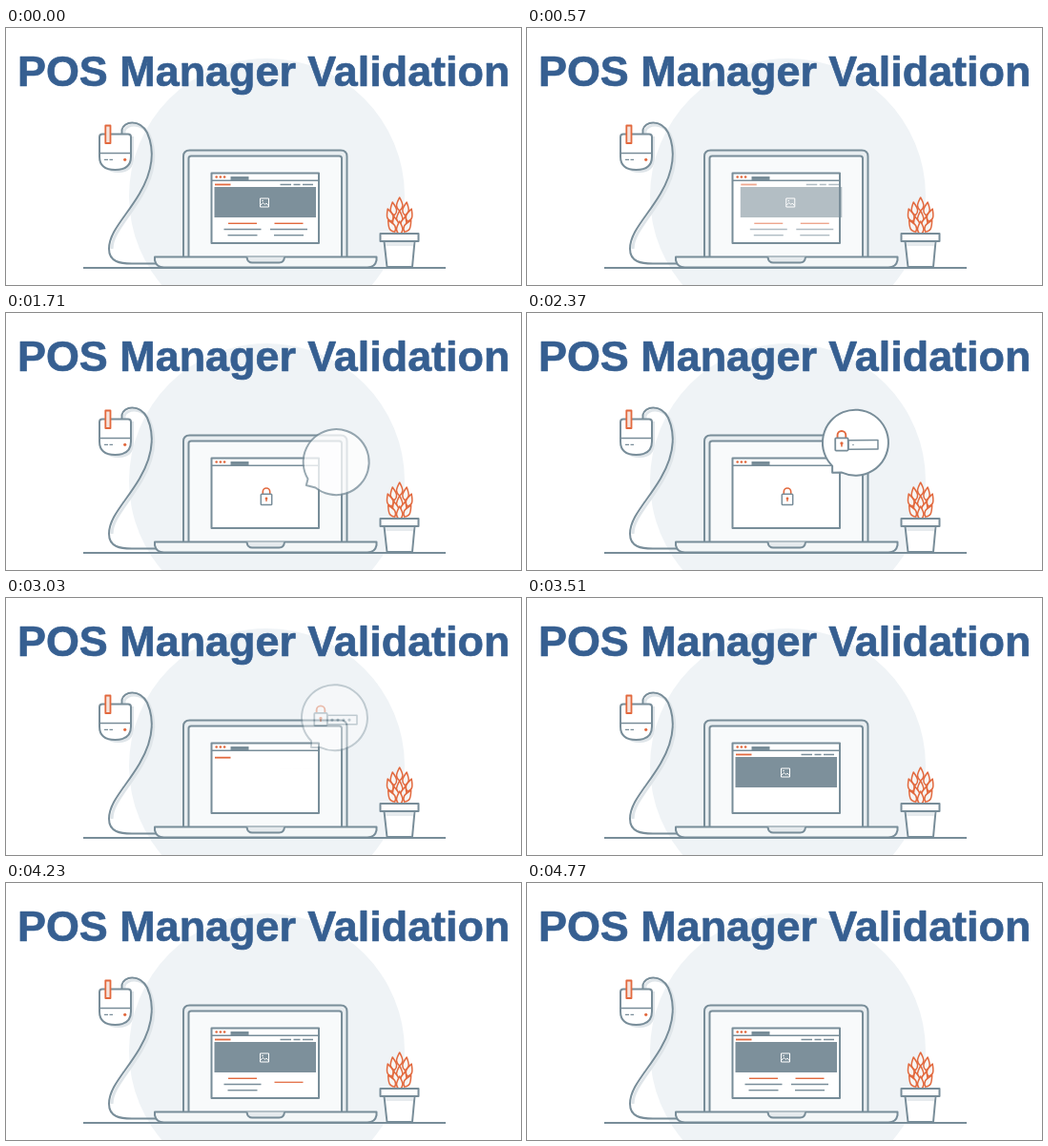
These frames come from a looping animation (540 px wide and 270 px high, 4.8 s). An HTML page:

```html
<!DOCTYPE html>
<html lang="en">
<head>
<meta charset="utf-8">
<title>POS Manager Validation</title>
<style>
  html, body { margin: 0; width: 100%; height: 100%; overflow: hidden; background: #fff; }
  svg { display: block; width: 100vw; height: 100vh; }
  .title { font: bold 44.9px "Liberation Sans", Arial, sans-serif; fill: #365f91; stroke: #365f91; stroke-width: .7; }
  .slate { stroke: #788d99; }
  .orange { stroke: #e2693e; }
  .thin { stroke-width: 1.3; }
</style>
</head>
<body>
<svg viewBox="0 0 540 270" fill="none" stroke-width="2" stroke-linejoin="round">
  <defs>
    <g id="lock">
      <path class="orange" stroke-width="1.6" d="M-3.7 -3V-5.3a3.7 3.7 0 0 1 7.4 0V-3"/>
      <rect class="slate" stroke-width="1.5" x="-5.7" y="-2.7" width="11.4" height="11.2" rx=".8" fill="#fff"/>
      <circle cy="1.9" r="1.4" fill="#e2693e"/>
      <path class="orange thin" d="M0 2V5"/>
    </g>
    <path id="leaf" class="orange" stroke-width="1.5" d="M0 0C2 4 3.2 6 3.2 8.6C3.2 11 1.8 12.6 0 14C-1.8 12.6 -3.2 11 -3.2 8.6C-3.2 6 -2 4 0 0Z" fill="#f7f5f4"/>
  </defs>

  <circle cx="273.5" cy="176.5" r="144.5" fill="#eff3f6"/>
  <text class="title" x="12" y="60.5">POS Manager Validation</text>

  <g id="mouse">
    <path stroke="#dfe5e9" stroke-width="3" d="M124 112V108C126 101 142 98 150 112C158 130 156 152 142 176C128 200 111 216 111 232"/>
    <path fill="#dfe5e9" d="M101 114H134V136Q134 152 118 152Q101 152 101 136Z"/>
    <path class="slate" d="M121.5 112V107C123 98 140 95 148 110C156 128 154 150 140 174C126 198 108 214 108 232C108 246 120 247.500 132 247.500H158"/>
    <path class="slate" fill="#fff" d="M101 111.500H128Q131 111.500 131 114.500V135Q131 149 114.500 149Q98 149 98 135V114.500Q98 111.500 101 111.500Z"/>
    <path class="slate thin" d="M98 131.500H131M103 138.300H107M108.500 138.300H112"/>
    <rect class="orange" stroke-width="1.8" x="104.300" y="102.500" width="5.200" height="18.500" fill="#f6e4dd"/>
    <circle id="led" cx="124.700" cy="138.300" r="1.600" fill="#e2693e"/>
  </g>

  <g id="plant">
    <g id="leaves"></g>
    <path class="slate" fill="#fff" d="M396.500 224H428.500L426 251H399.500Z"/>
    <path fill="#e6ebee" d="M398 225H427.300L427 229H398.300Z"/>
    <rect class="slate" x="392.500" y="216" width="40" height="8" fill="#fff"/>
  </g>

  <g id="laptop" class="slate">
    <path fill="#e9eef1" d="M186 241V135Q186 128.500 192.500 128.500H351Q357.500 128.500 357.500 135V241Z"/>
    <path fill="#f8fafb" d="M191.500 241V137Q191.500 134.500 194 134.500H349.500Q352 134.500 352 137V241Z"/>
    <path fill="#f4f7f8" d="M156 240.500H388.500V244Q387 251.500 379 251.500H165.500Q157.500 251.500 156 244Z"/>
    <path fill="#e6ebee" d="M252.500 240.500Q253 246.500 258 246.500H286.500Q291.500 246.500 292 240.500"/>
    <path d="M81 252H461"/>
  </g>

  <g id="window">
    <rect class="slate" x="215.500" y="152.500" width="112.500" height="73.500" fill="#fff"/>
    <path class="slate" stroke-width="1.500" d="M215.500 160.300H328"/>
    <path d="M235.500 160V156H254.500V160Z" fill="#788d99"/>
    <g fill="#e2693e"><circle cx="220.700" cy="156.500" r="1.300"/><circle cx="224.900" cy="156.500" r="1.300"/><circle cx="229.100" cy="156.500" r="1.300"/></g>
    <g id="page">
      <path class="orange" stroke-width="1.800" d="M219 164.500H235.500"/>
      <path class="slate thin" d="M287.500 164.500H299M301.500 164.500H308.500M311 164.500H322"/>
      <g>
        <rect x="218.500" y="167" width="106.500" height="32" fill="#7d909b"/>
        <rect x="266.500" y="179" width="9" height="9" stroke="#fff" stroke-width="1"/>
        <path stroke="#fff" stroke-width="1" d="M267 186L269.500 183.500L271.500 185.500L273 184L275 186.500"/>
        <circle cx="269" cy="181.500" r=".8" fill="#fff"/>
      </g>
    </g>
    <g id="pageLock"><use href="#lock"/></g>
  </g>

  <g id="bubble">
    <path class="slate" fill="#fff" d="M-25 24V31H-15A34.500 34.500 0 1 0 -25 24Z"/>
    <g id="field">
      <rect id="box" class="slate" stroke-width="1.500" x="-8" y="-2.800" height="9.500" fill="#fff"/>
      <g id="dots" fill="#788d99"></g>
    </g>
    <g id="bubbleLock"><use href="#lock" transform="scale(1.180)"/></g>
  </g>
</svg>
<script>
const LOOP = 4800;
const byId = id => document.getElementById(id);
const clamp = v => Math.min(1, Math.max(0, v));
const progress = (t, start, length) => clamp((t - start) / length);
const easeOut = p => 1 - (1 - p) ** 3;
const easeIn = p => p * p;

function add(parent, tag, attrs) {
  const node = document.createElementNS("http://www.w3.org/2000/svg", tag);
  for (const key in attrs) node.setAttribute(key, attrs[key]);
  return parent.appendChild(node);
}

function pose(node, x, y, opacity = 1, extra = "") {
  node.setAttribute("transform", `translate(${x} ${y}) ${extra}`);
  node.setAttribute("opacity", opacity);
}

// Leaves: offset from the stem, top edge and tilt, mirrored left and right
for (const [dx, y, tilt] of [[0, 178, 0], [7.5, 183, 8], [0, 192, 0], [12.5, 190, 18], [6, 198, 14], [12, 202, 30], [0, 203, 0]])
  for (const side of dx ? [-1, 1] : [1])
    add(byId("leaves"), "use", { href: "#leaf", transform: `translate(${412.7 + side * dx} ${y}) rotate(${side * tilt})` });

const page = byId("page");
for (const x of [248, 296.5])
  [[15, "orange"], [19.5, "slate"], [15.5, "slate"]].forEach(([half, tone], row) =>
    add(page, "path", { class: tone, "stroke-width": 1.4, d: `M${x - half} ${205.3 + row * 6.2}h${half * 2}` }));
const parts = [...page.children];
const entrances = parts.map((_, i) => i < 3 ? 2910 + i * 120 : 3675 + (i - 3) * 150);

const dots = [0, 1, 2, 3].map(i => add(byId("dots"), "circle", { cx: -3 + i * 6, cy: 2 }));

function drawPage(t) {
  const leaving = progress(t, 420, 360);
  const entering = t > 2700;
  pose(page, entering ? 0 : 30 * easeIn(leaving), 0, entering ? 1 : 1 - leaving);
  parts.forEach((part, i) => {
    const p = entering ? progress(t, entrances[i], 300) : 1;
    pose(part, 0, 15 * (1 - easeOut(p)), clamp(p * 2.6));
  });
  const lockIn = progress(t, 720, 270);
  const lockOut = progress(t, 2760, 210);
  pose(byId("pageLock"), 273, 193 + 22 * (1 - easeOut(lockIn)) - 8 * easeIn(lockOut), lockIn * (1 - lockOut));
}

function drawBubble(t) {
  const age = Math.max(0, t - 1620);
  const spring = 72 * Math.exp(-.0062 * age) * Math.cos(age / 135 * Math.PI / 2);
  const leaving = progress(t, 2850, 300);
  const lift = 13 * (1 - (1 - leaving) ** 2);
  pose(byId("bubble"), 345 + spring * .08, 137 + spring - lift,
    progress(t, 1620, 120) * (1 - leaving), `rotate(${spring * .7})`);

  const lockIn = progress(t, 1890, 210);
  pose(byId("bubbleLock"), -15, -2 + 10 * (1 - easeOut(lockIn)), lockIn);
  const open = easeOut(progress(t, 2070, 270));
  byId("field").setAttribute("opacity", open > 0 ? 1 : 0);
  byId("box").setAttribute("width", 31 * open);
  dots.forEach((dot, i) => dot.setAttribute("r", 1.6 * progress(t, 2325 + i * 80, 90)));
}

function drawLed(t) {
  const phase = t % 960;
  const dark = phase >= 420 && phase < 480;
  byId("led").setAttribute("opacity", dark ? 0 : 1);
}

function draw(now) {
  const t = now % LOOP;
  drawPage(t);
  drawBubble(t);
  drawLed(t);
}

const begin = performance.now();
function tick() {
  draw(performance.now() - begin);
  requestAnimationFrame(tick);
}
tick();
</script>
</body>
</html>
```
